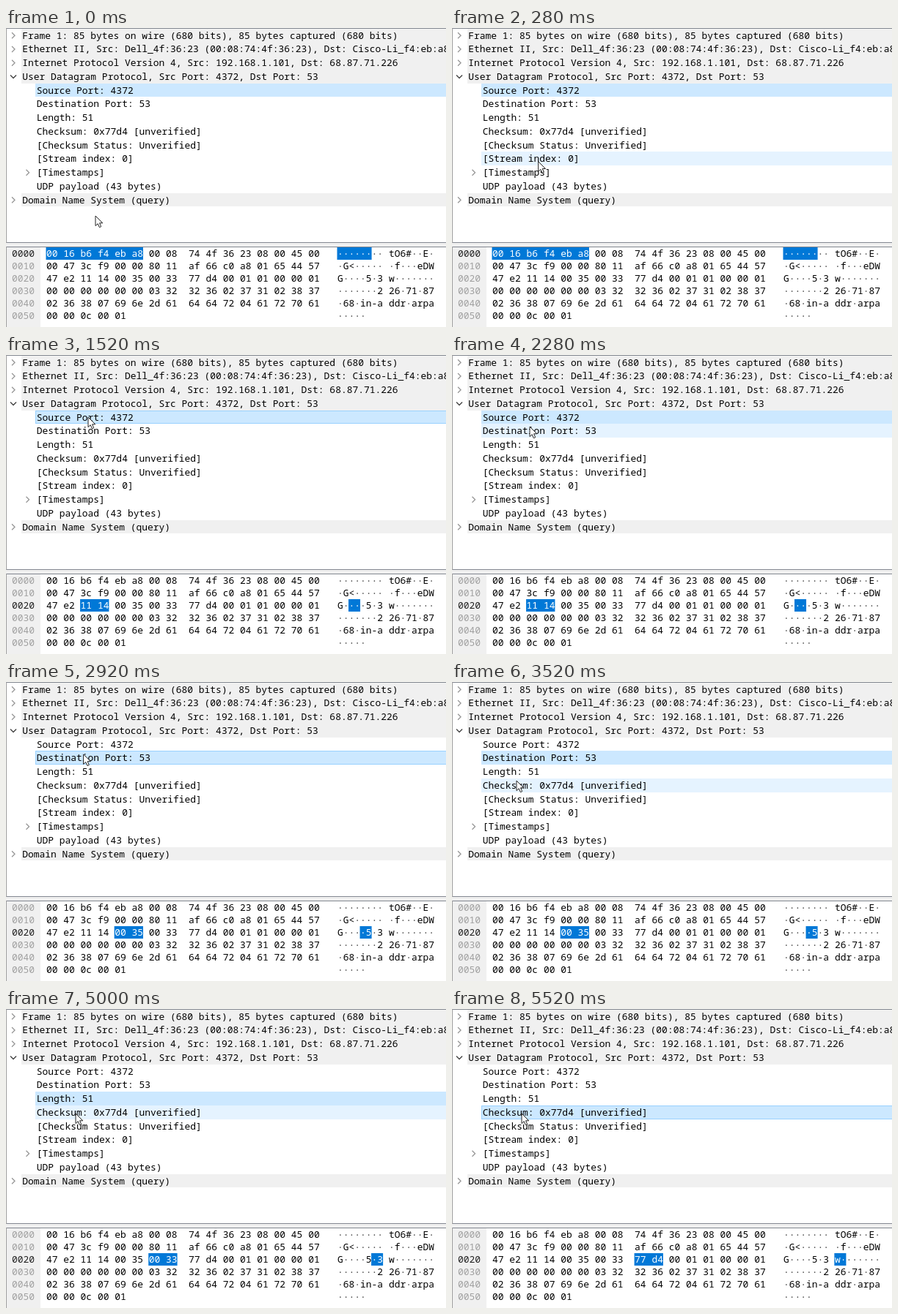
These frames come from a looping animation (600x409 px, 5.56 s). An HTML page:

```html
<!DOCTYPE html>
<html lang="en">
<head>
<meta charset="utf-8">
<title>Packet details</title>
<style>
  html, body { margin: 0; width: 100%; height: 100%; overflow: hidden; background: #fff; }
  svg { display: block; width: 600px; height: 409px; }
  text { font: 12.94px "Noto Sans Mono", "DejaVu Sans Mono", monospace; white-space: pre; }
</style>
</head>
<body>
<svg id="stage" viewBox="0 0 600 409" xmlns="http://www.w3.org/2000/svg"></svg>
<script>
const stage = document.getElementById('stage');
const LOOP = 5560, STEP = 40;
const CHAR = 7.764, ROW = 18.75, ROW_TOP = .6;
const HEX_X = 55, ASCII_X = 452, HEX_TOP = 300, HEX_ROW = 17;
const GREY = '#f0f0f0', BLUE = '#0078d7', BORDER = '#828790';

const rows = [
  { text: 'Frame 1: 85 bytes on wire (680 bits), 85 bytes captured (680 bits)', depth: 0, arrow: 'right' },
  { text: 'Ethernet II, Src: Dell_4f:36:23 (00:08:74:4f:36:23), Dst: Cisco-Li_f4:eb:a8', depth: 0, arrow: 'right' },
  { text: 'Internet Protocol Version 4, Src: 192.168.1.101, Dst: 68.87.71.226', depth: 0, arrow: 'right' },
  { text: 'User Datagram Protocol, Src Port: 4372, Dst Port: 53', depth: 0, arrow: 'down' },
  { text: 'Source Port: 4372', depth: 1 },
  { text: 'Destination Port: 53', depth: 1 },
  { text: 'Length: 51', depth: 1 },
  { text: 'Checksum: 0x77d4 [unverified]', depth: 1 },
  { text: '[Checksum Status: Unverified]', depth: 1 },
  { text: '[Stream index: 0]', depth: 1 },
  { text: '[Timestamps]', depth: 1, arrow: 'right' },
  { text: 'UDP payload (43 bytes)', depth: 1 },
  { text: 'Domain Name System (query)', depth: 0, arrow: 'right' },
];

const packet = `
  00 16 b6 f4 eb a8 00 08 74 4f 36 23 08 00 45 00
  00 47 3c f9 00 00 80 11 af 66 c0 a8 01 65 44 57
  47 e2 11 14 00 35 00 33 77 d4 00 01 01 00 00 01
  00 00 00 00 00 00 03 32 32 36 02 37 31 02 38 37
  02 36 38 07 69 6e 2d 61 64 64 72 04 61 72 70 61
  00 00 0c 00 01`.trim().split(/\s+/);

// Selected tree row and highlighted byte range from each moment on.
const clicks = [
  { at: 0, row: 4, first: 0, count: 6 },
  { at: 1240, row: 4, first: 34, count: 2 },
  { at: 2560, row: 5, first: 36, count: 2 },
  { at: 3880, row: 6, first: 38, count: 2 },
  { at: 5280, row: 7, first: 40, count: 2 },
];

// Pointer stops: time, x, y.
const path = [
  [0, 122, 257], [80, 122, 257], [520, 112, 85], [1720, 112, 85],
  [2160, 106, 98], [2880, 106, 98], [3320, 88, 135], [3560, 88, 135],
  [3800, 86, 127], [4520, 86, 127], [4880, 95, 143], [LOOP, 95, 143],
];

function add(tag, attrs, content) {
  const node = document.createElementNS('http://www.w3.org/2000/svg', tag);
  for (const key in attrs) node.setAttribute(key, attrs[key]);
  if (content !== undefined) node.textContent = content;
  return stage.appendChild(node);
}
const rect = (x, y, width, height, fill) => add('rect', { x, y, width, height, fill });
const label = (x, y, content, fill = '#000') => add('text', { x, y, fill }, content);

function chevron(x, y, direction) {
  const down = direction === 'down';
  add('path', {
    d: down ? `M${x - 4} ${y - 2}l4 4 4-4` : `M${x - 2} ${y - 4}l4 4-4 4`,
    fill: 'none', stroke: down ? '#404040' : '#969696', 'stroke-width': 1.3,
  });
}

function buildTree() {
  return rows.map(({ text, depth, arrow }, i) => {
    const y = ROW_TOP + i * ROW, left = depth ? 40 : 21;
    const top = Math.round(y), height = Math.round(y + ROW) - top;
    const base = depth ? '#fff' : GREY;
    const back = rect(left, top, 600 - left, height, base);
    const frame = add('rect', {
      x: left + .5, y: top + .5, width: 600 - left, height: height - 1,
      fill: 'none', stroke: '#99d1ff',
    });
    if (arrow) chevron(10 + depth * 19.5, y + 9.7, arrow);
    label(22.2 + depth * 19.5, y + 13.9, text);
    return { back, frame, base };
  });
}

function buildBytes() {
  return packet.map((hex, i) => {
    const line = Math.floor(i / 16), column = i % 16, gap = column > 7 ? 1 : 0;
    const y = HEX_TOP + line * HEX_ROW + 13;
    const code = parseInt(hex, 16), printable = code > 32 && code < 127;
    return {
      hex: label(HEX_X + (column * 3 + gap) * CHAR, y, hex),
      char: label(ASCII_X + (column + gap) * CHAR, y, printable ? String.fromCharCode(code) : '·'),
      ink: printable ? '#000' : '#444',
    };
  });
}

rect(0, 0, 600, 409, '#fff');
const tree = buildTree();
rect(0, 0, 600, 1, BORDER);
rect(0, 293, 600, 6, GREY);
rect(0, 293, 600, 1, BORDER);
rect(0, 299, 47, 110, GREY);
rect(0, 299, 600, 1, BORDER);
rect(0, 0, 1, 294, '#a0a0a0');
rect(0, 299, 1, 110, '#a0a0a0');

const hexMark = rect(0, 0, 0, HEX_ROW, BLUE);
const asciiMark = rect(0, 0, 0, HEX_ROW, BLUE);
const offsets = Array.from({ length: 6 }, (_, i) =>
  label(8, HEX_TOP + i * HEX_ROW + 13, `00${i}0`));
const bytes = buildBytes();
const pointer = add('path', {
  d: 'M0 0V13.6L3.2 10.7 5.4 15.7 7.7 14.7 5.6 9.8H9.8Z',
  fill: '#fff', stroke: '#222', 'stroke-width': 1, 'stroke-linejoin': 'round',
});

function pointerAt(time) {
  const next = path.findIndex(stop => stop[0] > time);
  const [t0, x0, y0] = path[next - 1], [t1, x1, y1] = path[next];
  const u = (time - t0) / (t1 - t0), ease = u * u * (3 - 2 * u);
  return { x: x0 + (x1 - x0) * ease, y: y0 + (y1 - y0) * ease };
}

function place(mark, x, y, width) {
  mark.setAttribute('x', x - .5);
  mark.setAttribute('y', y);
  mark.setAttribute('width', width + .5);
}

function draw(time) {
  const { x, y } = pointerAt(time);
  const { row, first, count } = clicks.filter(click => click.at <= time).pop();
  const hovered = Math.floor((y - ROW_TOP) / ROW);

  tree.forEach(({ back, frame, base }, i) => {
    const selected = i === row, hover = i === hovered;
    back.setAttribute('fill', selected ? '#cce8ff' : hover ? '#e5f3ff' : base);
    frame.setAttribute('visibility', selected && hover ? 'visible' : 'hidden');
  });

  const line = Math.floor(first / 16), column = first % 16, gap = column > 7 ? 1 : 0;
  const top = HEX_TOP + line * HEX_ROW;
  place(hexMark, HEX_X + (column * 3 + gap) * CHAR, top, (count * 3 - 1) * CHAR);
  place(asciiMark, ASCII_X + (column + gap) * CHAR, top, count * CHAR);
  offsets.forEach((node, i) => node.setAttribute('fill', i === line ? '#222' : '#a0a0a0'));
  bytes.forEach(({ hex, char, ink }, i) => {
    const marked = i >= first && i < first + count;
    hex.setAttribute('fill', marked ? '#fff' : '#000');
    char.setAttribute('fill', marked ? '#fff' : ink);
  });

  pointer.setAttribute('transform', `translate(${x} ${y})`);
}

const start = performance.now();
function tick() {
  const time = (performance.now() - start) % LOOP;
  draw(Math.floor(time / STEP) * STEP);
  requestAnimationFrame(tick);
}
tick();
</script>
</body>
</html>
```
